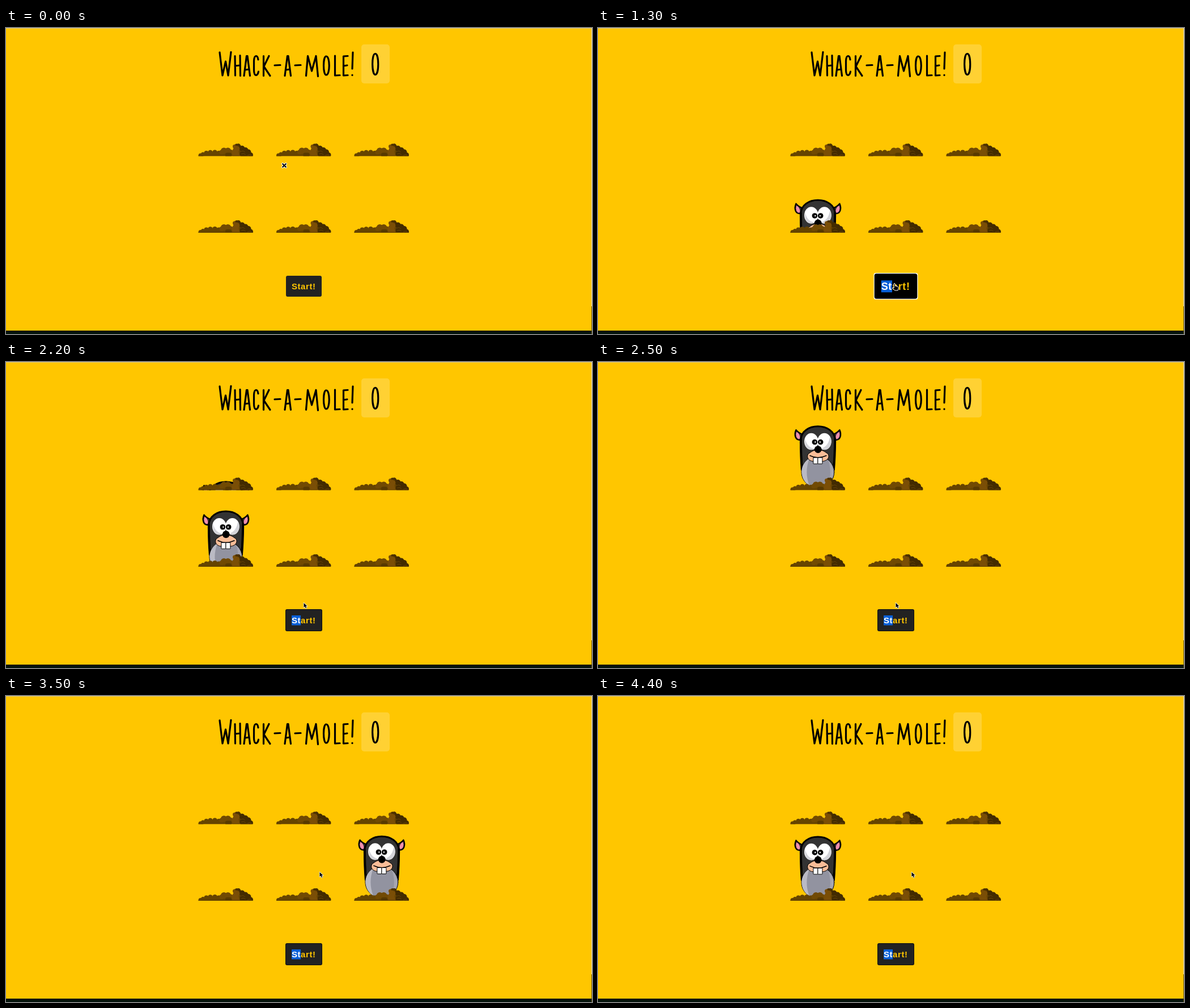
Animation of 1034x541 px, one loop 4.5 s. Source, as an HTML page with a canvas:

```html
<!DOCTYPE html>
<html lang="en">
<head>
<meta charset="utf-8">
<title>Whack-a-mole!</title>
<style>
html, body { margin: 0; width: 100%; height: 100%; overflow: hidden; background: #ffc600; }
canvas { position: absolute; left: 0; top: 0; display: block; }
h1 { position: absolute; left: 376px; top: 40px; margin: 0; color: transparent; font: bold 32px "Liberation Sans", sans-serif; white-space: nowrap; }
</style>
</head>
<body>
<h1>Whack-a-mole! 0</h1>
<canvas id="stage" width="1034" height="541"></canvas>
<script>
const ctx = document.getElementById("stage").getContext("2d");
const LOOP = 4500, EASE_MS = 400, TRAVEL = 115;
const COLS = [387.5, 525, 662.5], ROWS = [226.5, 362];

// Stretches of time where the picture stands still: [from, to]
const HOLDS = [[0, 200], [1000, 1200], [1900, 2200], [2500, 2800], [2900, 3100], [3100, 3400], [3500, 4100], [4100, 4400]];
const PEEPS = [
  { col: 0, row: 1, up: 1180, down: 2150 },
  { col: 0, row: 0, up: 2150, down: 3080 },
  { col: 2, row: 1, up: 3080, down: 4040 },
  { col: 0, row: 1, up: 4040, down: 9000 }
];
const CURSOR = [
  [190, 491, 243], [350, 500, 300], [500, 513, 392], [600, 519, 441], [700, 522, 451],
  [1300, 522, 451], [1500, 525, 434], [1600, 525.5, 426], [2750, 525.5, 426], [2900, 553.5, 311.5]
];

// Hand lettering, baseline at y = 0
const GLYPHS = {
  W: "M1-43L6-2L11.5-27L16-2L21-43.5",
  H: "M2-36.5L2.5-2M11-37.5L11.5-1.5M2-19L11-20",
  A: "M1-1.5L5.5-36.5L7-36.5L11.5-1.5M3-12L10-13",
  C: "M9-30C8-39 2-39 1.5-28L1.5-12C1.5 0 8 0 9.5-9",
  K: "M1.5-36.5L1.5-1.5M11-36.5L2-18L13-1.5",
  M: "M1.5-1.5L4.5-36.5L11.5-10L19-36.5L22.5-.5",
  O: "M6-36C0-36 0-3 6-3C13-3 13-36 6-36Z",
  L: "M1.5-37L1.5-2L10-2.5",
  E: "M9-36.5L1.5-36L1.5-2L9-2.5M2-19L8-20",
  "-": "M1-20L11-20.5",
  "!": "M3-43L2-14M2-3L2-2.5",
  "0": "M6-40.5C-1-40.5 0-3.5 6-3.5C13-3.5 13-40.5 6-40.5Z"
};
const WORD = "WHACK-A-MOLE!";
const WORD_X = [376, 402, 419, 436, 453, 473, 491, 509, 528, 559, 579, 594, 609];

function bezier(p, x1, y1, x2, y2) {
  if (p <= 0) return 0;
  if (p >= 1) return 1;
  const at = (u, a, b) => 3 * u * (1 - u) * (1 - u) * a + 3 * u * u * (1 - u) * b + u * u * u;
  let lo = 0, hi = 1;
  for (let i = 0; i < 20; i++) {
    const mid = (lo + hi) / 2;
    if (at(mid, x1, x2) < p) lo = mid; else hi = mid;
  }
  return at(lo, y1, y2);
}
const ease = (t, start) => bezier((t - start) / EASE_MS, 0.25, 0.1, 0.25, 1);

function rect(x, y, w, h, color) {
  ctx.fillStyle = color;
  ctx.fillRect(x, y, w, h);
}
function round(x, y, w, h, r, fill, stroke) {
  ctx.beginPath();
  ctx.roundRect(x, y, w, h, r);
  if (fill) { ctx.fillStyle = fill; ctx.fill(); }
  if (stroke) { ctx.strokeStyle = stroke; ctx.stroke(); }
}
function oval(x, y, rx, ry, fill, line) {
  ctx.beginPath();
  ctx.ellipse(x, y, rx, ry, 0, 0, Math.PI * 2);
  ctx.fillStyle = fill;
  ctx.fill();
  if (line) { ctx.lineWidth = line; ctx.strokeStyle = "#000"; ctx.stroke(); }
}
function shape(d, fill, line, stroke = "#000") {
  const path = new Path2D(d);
  if (fill) { ctx.fillStyle = fill; ctx.fill(path); }
  if (line) { ctx.lineWidth = line; ctx.strokeStyle = stroke; ctx.stroke(path); }
}
function glyph(ch, x, y) {
  ctx.save();
  ctx.translate(x, y);
  shape(GLYPHS[ch], null, 3.2);
  ctx.restore();
}

function drawScene() {
  rect(0, 0, 1034, 541, "#ffc600");
  rect(0, 0, 1034, 1, "#d8c88c");
  rect(0, 535, 1034, 6, "#03130c");
  rect(1033, 0, 1, 492, "#e4dcc0");
  rect(1033, 492, 1, 49, "#6b5a20");
  round(627, 29, 50, 69, 5, "#ffd133");
  [...WORD].forEach((ch, i) => glyph(ch, WORD_X[i], 86));
  glyph("0", 645.5, 86);
}

function lumps(color, list) {
  list.forEach(([x, y, r]) => oval(x, y, r, r, color));
}
function drawDirt(cx, bottom) {
  ctx.save();
  ctx.translate(cx - 48, bottom - 22);
  ctx.beginPath();
  ctx.rect(-1, -1, 98, 23);
  ctx.clip();
  shape("M0 22L4 19L18 17L40 15L60 13L75 6L90 15L96 22Z", "#664400");
  lumps("#664400", [[4, 21, 4], [8, 18.5, 3.5], [14, 16.5, 4], [21, 15.5, 4.3], [29, 15.5, 4.5], [36, 16.5, 4]]);
  lumps("#714a03", [[45, 12.5, 5.5], [52, 12.5, 5.5], [57, 15, 4.5], [41, 15, 4]]);
  lumps("#432b00", [[70, 5, 5], [77, 8.5, 5], [83, 11.5, 5], [88, 15, 5], [92, 20, 4.5], [81, 18, 8]]);
  shape("M60 22L59 14L62 8L61 3L65 1L71 3L73 9L71 14L73 22Z", "#7a4e06");
  lumps("#7a4e06", [[64, 5, 3.5], [68, 4, 3]]);
  lumps("#4c3100", [[67, 2, 2], [71, 2.5, 2.5]]);
  round(47.5, 16, 11, 8, 3, "#573900");
  shape("M75 14Q79 11 82 15M76 18Q80 16 83 19M86 21Q90 18 93 20", null, 0.7, "#76500f");
  rect(0, 21, 96, 1, "#5c3b00");
  ctx.restore();
}

function drawMole(cx, top, floor) {
  ctx.save();
  ctx.beginPath();
  ctx.rect(cx - 48, floor - 125, 96, 125);
  ctx.clip();
  ctx.translate(cx + 0.4, top);
  for (const side of [-1, 1]) {
    ctx.save();
    ctx.scale(side, 1);
    shape("M28 15Q35 12 38.5 7.5Q41.5 14 39.5 20Q37 26.5 29 25Z", "#333", 2.2);
    shape("M31 20Q32 13 38 10.5Q40 16 38 20.5Q35.5 25 32 24Z", "#f08fae", 0.6);
    ctx.restore();
  }
  shape("M-27 82Q-30 55-30 26C-30-7 30-7 30.5 26Q30 55 27 82Q20 104 0 104Q-20 104-27 82Z", "#333", 3);
  shape("M-30 25Q-30 55-28 78M30.3 25Q30 55 28 78", null, 4);
  oval(0, 82, 29, 28, "#9293a0", 1);
  shape("M-15 58C-33 68-33 95-15 106Q-24 82-15 58Z", "#babac4");
  shape("M18 61C31 72 30 95 18 104Q26 82 18 61Z", "#a6a6b2");
  for (const side of [-1, 1]) oval(side * 11.6, 28, 12.3, 14.8, "#fff");
  shape("M-22.5 22Q-20 38-6 41Q-12 44-18 40.5Q-24 35-22.5 22ZM21 19Q20 35 6 41Q12 44 18 40.5Q27 32 21 19Z", "#d4d4d9");
  oval(-5.5, 29, 4.8, 4.8, "#000");
  oval(4.8, 29, 4.8, 4.8, "#000");
  oval(-4.6, 29, 1.2, 1.3, "#fff");
  oval(4, 29, 1.2, 1.3, "#fff");
  shape("M0 44C-7 42-11 46-17 50C-21 58-14 63-8 63L8 63C15 63 22 57 18 50C12 46 8 42 0 44Z", "#fabd97", 1);
  shape("M-14 53Q0 60 15 53", null, 1.6);
  ctx.lineWidth = 1;
  round(-8, 56.5, 8, 11, 0.5, "#fff", "#000");
  round(0, 56.5, 8, 11, 0.5, "#fff", "#000");
  oval(0.3, 42, 6.4, 6.4, "#000");
  ctx.restore();
}

function drawButton(t) {
  const grow = ease(t, 590) - ease(t, 1500);
  const picked = t >= 650, focused = t >= 1200;
  const shade = Math.round(34 * (1 - Math.min(1, grow * 1.25)));
  ctx.save();
  ctx.translate(525.5, 456.5);
  ctx.scale(1 + 0.2 * grow, 1 + 0.2 * grow);
  if (focused) {
    const glow = Math.round(16 + 239 * Math.min(1, grow * 4));
    round(-32.5, -19.5, 65, 39, 3, `rgb(${glow},${glow},${glow})`);
  }
  round(-31.5, -18.5, 63, 37, 3, `rgb(${shade},${shade},${shade})`);
  ctx.font = 'bold 15px "Liberation Sans", Arial, sans-serif';
  ctx.letterSpacing = "0.55px";
  ctx.textBaseline = "alphabetic";
  const left = -21.5, base = 5.2;
  ctx.fillStyle = "#ffc600";
  ctx.fillText("Start!", left, base);
  if (picked) {
    rect(left, -8.5, ctx.measureText("St").width, 17.5, "#0860d8");
    ctx.fillStyle = "#fff";
    ctx.fillText("St", left, base);
  }
  ctx.restore();
}

function cursorAt(t) {
  let i = 0;
  while (i < CURSOR.length - 1 && CURSOR[i + 1][0] <= t) i++;
  const a = CURSOR[i], b = CURSOR[i + 1] || a;
  const p = b === a ? 0 : Math.max(0, (t - a[0]) / (b[0] - a[0]));
  return [a[1] + (b[1] - a[1]) * p, a[2] + (b[2] - a[2]) * p];
}
function drawCursor(t) {
  const [x, y] = cursorAt(t);
  ctx.save();
  ctx.translate(x, y);
  if (t < 200) {
    const cross = "M-2.8-2.8L2.8 2.8M2.8-2.8L-2.8 2.8";
    shape(cross, null, 4.2, "#fff");
    shape(cross, null, 2.2);
  } else if (t >= 590 && t < 1500) {
    shape("M0 1Q1-1 2 1L2.5 5L7 6Q8.5 7 8 10L7 13L1.5 13L-2 9Q-2 7 0 8Z", "#000", 1, "#fff");
  } else {
    const arrow = "M0 0L0 8L2 6.3L3.4 9.5L4.8 8.9L3.4 5.8L6 5.8Z";
    shape(arrow, null, 1.5, "#fff");
    shape(arrow, "#000");
  }
  ctx.restore();
}

function stepTime(ms) {
  const t = Math.floor((ms % LOOP) / 100) * 100;
  const hold = HOLDS.find(([from, to]) => t >= from && t < to);
  return hold ? hold[0] : t;
}

function draw(ms) {
  const t = stepTime(ms);
  ctx.lineCap = ctx.lineJoin = "round";
  drawScene();
  for (const { col, row, up, down } of PEEPS) {
    const rise = ease(t, up) - ease(t, down);
    if (rise > 0) drawMole(COLS[col], ROWS[row] - TRAVEL * rise, ROWS[row]);
  }
  for (const y of ROWS) for (const x of COLS) drawDirt(x, y);
  drawButton(t);
  drawCursor(t);
}

const begin = performance.now();
function tick() {
  draw(performance.now() - begin);
  requestAnimationFrame(tick);
}
tick();
</script>
</body>
</html>
```
